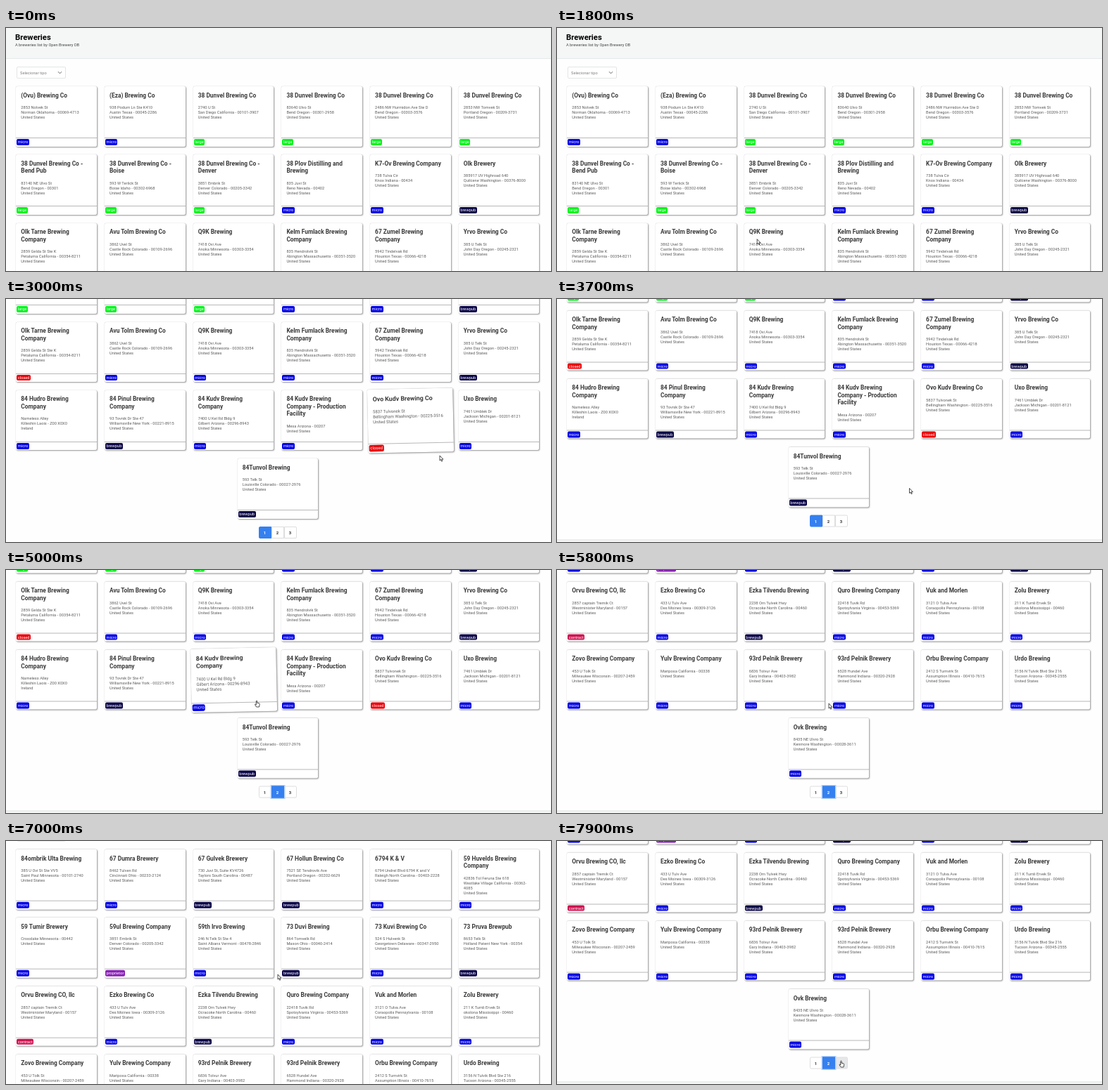
These frames come from a looping animation (774x346 px, 8 s). An HTML page:

```html
<!DOCTYPE html>
<html lang="en">
<head>
<meta charset="utf-8">
<title>Breweries</title>
<style>
  html, body { margin: 0; width: 100%; height: 100%; overflow: hidden; background: #fff; }
  body { position: relative; font: 5.7px/7px Roboto, sans-serif; color: #5c5c5c; }
  #stage { position: absolute; left: 0; top: 0; width: 774px; height: 346px; overflow: hidden; background: #fefefe; }
  #world { position: absolute; left: 0; top: 0; width: 774px; height: 608px; }
  header, footer { position: absolute; left: 0; width: 774px; background: #f5f7f7; box-sizing: border-box; }
  header { top: 0; height: 43.5px; border-bottom: 1px solid #e6e9e9; color: #444; }
  footer { top: 604px; height: 5px; border-top: 1px solid #e2e4e4; }
  h1 { position: absolute; left: 13px; top: 7.4px; margin: 0; font-size: 11.3px; line-height: 14px; color: #000; }
  header p { position: absolute; left: 13px; top: 20.5px; margin: 0; }
  .select { position: absolute; left: 15px; top: 55px; width: 70px; height: 17px; box-sizing: border-box;
    border: 1px solid #e4e5e5; border-radius: 2px; padding-left: 4px; line-height: 16px; color: #808080; background: #fff; }
  .select svg { position: absolute; left: 57px; top: 5px; }
  .card { position: absolute; width: 114.5px; height: 85.5px; box-sizing: border-box; padding: 7.5px 0 0 7px;
    background: #fff; border-radius: 2px; white-space: pre;
    box-shadow: 0 0 1px rgba(0,0,0,.3), 1px 1px 2px rgba(0,0,0,.4); }
  .card h2 { margin: 0 0 9px; font-size: 8.4px; line-height: 10.5px; font-weight: 700; color: #3a3a3a; }
  .card::after { content: ""; position: absolute; left: 0; right: 0; top: 73px; height: 1px; background: #b8b8b8; }
  .tag { position: absolute; left: 1px; top: 75px; height: 8.8px; padding: 0 1.5px; border-radius: 2px;
    line-height: 8.8px; color: #fff; }
  .pager { position: absolute; left: 358.5px; top: 569px; display: flex; }
  .pager span { width: 18px; height: 17px; box-sizing: border-box; border: 1px solid #dedede;
    background: #fff; text-align: center; font-weight: 700; font-size: 6px; line-height: 15px; color: #333; }
  .pager span:first-child { border-radius: 2px 0 0 2px; }
  .pager span:last-child { border-radius: 0 2px 2px 0; }
  .pager .hover { background: #e6e7e8; }
  .pager .on { background: #3580f0; border-color: #3580f0; color: #fff; }
  .pager .focus { position: relative; box-shadow: 0 0 0 1.5px #b5d2fb; }
  #cursor { position: absolute; left: 0; top: 0; overflow: visible; }
  #cursor path { fill: #fff; stroke: #222; stroke-width: .8; stroke-linejoin: round; }
</style>
</head>
<body>
<div id="stage">
  <div id="world">
    <header><h1>Breweries</h1><p>A breweries list by Open Brewery DB</p></header>
    <div class="select">Selecionar tipo
      <svg width="7" height="6" fill="none" stroke="#666" stroke-width="1"><path d="M1 1.2 3.5 3.8 6 1.2"/></svg>
    </div>
    <div class="page"></div>
    <div class="page"></div>
    <div class="pager"><span>1</span><span>2</span><span>3</span></div>
    <footer></footer>
  </div>
  <svg id="cursor" width="10" height="12">
    <path id="arrow" d="M0 0V7L1.6 5.6 2.7 8.2 3.8 7.7 2.7 5.2H4.9Z"/>
    <path id="hand" d="M-.7 .5Q0-.5 .7 .5V3.2L3.6 3.9Q4.4 4.2 4.2 5.4L3.5 9H-.4L-2.4 5.9Q-2.6 4.9-1.6 5.2L-.7 6Z"/>
  </svg>
</div>
<script>
const LOOP = 8000, STEP = 100, BOTTOM = 261.5;
const COLORS = { micro: '#0000e6', large: '#00f51a', brewpub: '#0b0648', closed: '#ec0008',
  contract: '#cf1150', proprietor: '#8a22b5' };

// title / street / city / type, "|" breaks a line
const PAGES = [`
(Ovu) Brewing Co/2853 Nolvek St/Norman Oklahoma - 00069-4713/micro
(Eza) Brewing Co/938 Podum Ln Ste K410/Austin Texas - 00045-2286/micro
38 Dunvel Brewing Co/2740 U St/San Diego California - 00101-3907/large
38 Dunvel Brewing Co/83640 Ulvo St/Bend Oregon - 00301-2958/large
38 Dunvel Brewing Co/2486 NW Hurmidon Ave Ste D/Bend Oregon - 00303-3576/large
38 Dunvel Brewing Co/2853 NW Tomvek St/Portland Oregon - 00209-3731/large
38 Dunvel Brewing Co -|Bend Pub/83140 NE Ulvo St/Bend Oregon - 00301/large
38 Dunvel Brewing Co -|Boise/593 W Terlick St/Boise Idaho - 00302-6968/large
38 Dunvel Brewing Co -|Denver/3851 Embrik St/Denver Colorado - 00205-3342/large
38 Plov Distilling and|Brewing/835 Juvi St/Reno Nevada - 00402/micro
K7-Ov Brewing Company/738 Tulva Cir/Knox Indiana - 00434/micro
Olk Brewery/385917 UV Highroad 640/Quilcene Washington - 00376-8000/brewpub
Olk Tarne Brewing|Company/2859 Gelda St Ste K/Petaluma California - 00354-8211/closed
Avu Tolm Brewing Co/3862 Uvel St/Castle Rock Colorado - 00109-2696/micro
Q9K Brewing/7418 Ovi Ave/Anoka Minnesota - 00303-3354/micro
Kelm Fumlack Brewing|Company/835 Hendrolvik St/Abington Massachusetts - 00351-3520/micro
67 Zumel Brewing|Company/5942 Tindelvak Rd/Houston Texas - 00066-4218/micro
Yrvo Brewing Co/385 U Telk St/John Day Oregon - 00245-2321/brewpub
84 Hudro Brewing|Company/Nameless Alley/Killeshin Laois - Z00 X0X0/micro/Ireland
84 Pinul Brewing|Company/93 Tovnik Dr Ste 47/Williamsville New York - 00221-8915/brewpub
84 Kudv Brewing|Company/7400 U Kel Rd Bldg 9/Gilbert Arizona - 00296-8943/micro
84 Kudv Brewing|Company - Production|Facility//Mesa Arizona - 00207/micro
Ovo Kudv Brewing Co/5837 Tulvonek St/Bellingham Washington - 00225-3516/closed
Uxo Brewing/7461 Umblek Dr/Jackson Michigan - 00201-8121/micro
84Tunvol Brewing/593 Telk St/Louisville Colorado - 00027-2976/brewpub`, `
84ombrik Ulta Brewing/385 U Ovi St Ste VV5/Saint Paul Minnesota - 00101-2740/micro
67 Dumra Brewery/8462 Tulven Rd/Cincinnati Ohio - 00233-2124/micro
67 Gulvek Brewery/730 Juvi St, Suite KV4726/Taylors South Carolina - 00487/brewpub
67 Hollun Brewing Co/7521 SE Tendrovik Ave/Portland Oregon - 00202-6629/brewpub
6794 K & V/6794 Undrel Blvd 6794 K and V/Raleigh North Carolina - 00403-2228/micro
59 Huvelds Brewing|Company/42836 Tol Feruna Ste 618/Westlake Village California - 00362-|4085/micro
59 Tumir Brewery//Crosslake Minnesota - 00442/micro
59ul Brewing Company/3851 Embrik St/Denver Colorado - 00205-3342/proprietor
59th Irvo Brewing/246 N Telk St Ste 4/Saint Albans Vermont - 00478-2846/micro
73 Duvi Brewing/864 Tomvelk Rd/Mason Ohio - 00040-2414/brewpub
73 Kuvi Brewing Co/524 S Hulvenk St/Georgetown Delaware - 00347-2950/micro
73 Pruva Brewpub/8653 Telk St/Holland Patent New York - 00354/brewpub
Orvu Brewing CO, llc/2857 captain Tremik Ct/Westminister Maryland - 00157/contract
Ezko Brewing Co/433 U Tulv Ave/Des Moines Iowa - 00309-3126/micro
Ezka Tilvendu Brewing/2238 Orn Tulvek Hwy/Ocracoke North Carolina - 00460/brewpub
Quro Brewing Company/22418 Tuvik Rd/Spotsylvania Virginia - 00453-5369/micro
Vuk and Morlen/3121 O Tulva Ave/Coraopolis Pennsylvania - 00108/micro
Zolu Brewery/211 K Tumli Ervek St/okolona Mississippi - 00460/micro
Zovo Brewing Company/453 U Tolk St/Milwaukee Wisconsin - 00207-2459/micro
Yulv Brewing Company//Mariposa California - 00338/micro
93rd Pelnik Brewery/6836 Tolvur Ave/Gary Indiana - 00403-3982/micro
93rd Pelnik Brewery/6528 Hundel Ave/Hammond Indiana - 00320-2928/micro
Orbu Brewing Company/2412 S Tumvirk St/Assumption Illinois - 00410-7615/micro
Urdo Brewing/3156 N Tulvik Blvd Ste 216/Tucson Arizona - 00345-2555/micro
Ovk Brewing/8435 NE Ulvro St/Kenmore Washington - 00028-3611/micro`];

// [time, value...] steps
const SCROLL = [[2200, 0], [2500, 95], [3000, 245], [3250, BOTTOM], [5850, BOTTOM], [6300, 0],
  [6850, 0], [7400, BOTTOM]];
const POINTER = [[1650, 270, 350], [2200, 322, 169], [2500, 322, 169], [3000, 616, 223], [3400, 616, 223],
  [4000, 385, 316], [4550, 385, 316], [5000, 356, 186], [5250, 358, 187], [5600, 386, 190],
  [7300, 386, 190], [7700, 403.5, 313]];
// [from, to, card]
const HOVERS = [[1800, 1950, 14], [2000, 2600, 8], [2600, 2750, 9], [2750, 3150, 22], [3850, 3950, 24],
  [4600, 4850, 24], [4850, 5450, 20]];

const $ = selector => document.querySelector(selector);
const clamp = x => Math.max(0, Math.min(1, x));

function at(steps, t, column = 1) {
  const i = steps.findIndex(step => step[0] > t);
  if (i === 0) return steps[0][column];
  if (i < 0) return steps[steps.length - 1][column];
  const a = steps[i - 1], b = steps[i];
  return a[column] + (b[column] - a[column]) * (t - a[0]) / (b[0] - a[0]);
}

function add(parent, tag, text, className = '') {
  const el = parent.appendChild(document.createElement(tag));
  el.textContent = text;
  el.className = className;
  return el;
}

function makeCard(page, line, i) {
  const [title, street, city, type, country = 'United States'] = line.split('/');
  const card = add(page, 'div', '', 'card');
  card.style.left = (i === 24 ? 328.7 : 14.3 + i % 6 * 125.7) + 'px';
  card.style.top = 83.2 + Math.floor(i / 6) * 97.25 + 'px';
  add(card, 'h2', title.replaceAll('|', '\n'));
  for (const text of [street, ...city.split('|'), country]) if (text) add(card, 'div', text);
  add(card, 'span', type, 'tag').style.background = COLORS[type];
  return card;
}

const pages = [...document.querySelectorAll('.page')];
const cards = pages.map((page, p) => PAGES[p].trim().split('\n').map((line, i) => makeCard(page, line, i)));
const buttons = [...document.querySelectorAll('.pager span')];

function lift(card, t) {
  return Math.max(0, ...HOVERS.filter(h => h[2] === card)
    .map(([from, to]) => Math.min(clamp((t - from) / 150), clamp(1 - (t - to) / 150))));
}

function render(t) {
  $('#world').style.transform = `translateY(${-at(SCROLL, t)}px)`;

  const shown = t < 5200 ? 0 : 1;
  pages.forEach((page, i) => page.style.display = i === shown ? '' : 'none');
  cards[shown].forEach((card, i) => {
    const k = lift(i, t);
    card.style.transform = k ? `rotate(${-1.2 * k}deg) scale(${1 + .055 * k})` : '';
    card.style.zIndex = k ? 1 : '';
  });

  const active = t < 4600 ? 0 : 1;
  buttons.forEach((button, i) => {
    button.classList.toggle('on', i === active);
    button.classList.toggle('focus', i === 1 && active === 1);
    button.classList.toggle('hover', i === 2 && t >= 7600);
  });

  const hand = t >= 3900 && t < 5400 || t >= 7600;
  $('#cursor').style.display = t < 1700 ? 'none' : '';
  $('#cursor').style.transform = `translate(${at(POINTER, t)}px, ${at(POINTER, t, 2)}px)`;
  $('#arrow').style.display = hand ? 'none' : '';
  $('#hand').style.display = hand ? '' : 'none';
}

const start = performance.now();
function tick() {
  const t = (performance.now() - start) % LOOP;
  render(Math.floor(t / STEP) * STEP);
  requestAnimationFrame(tick);
}
tick();
</script>
</body>
</html>
```
